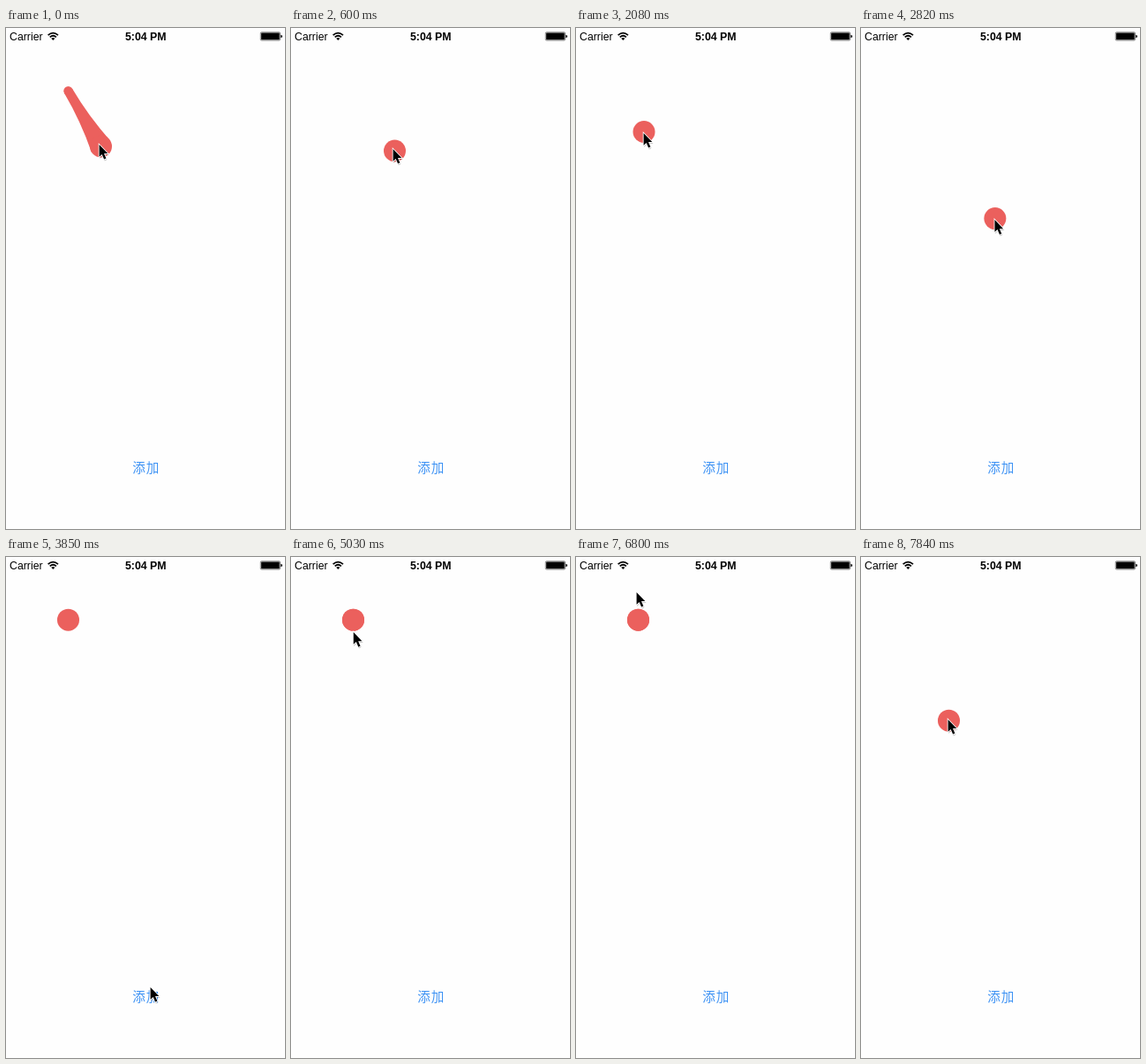
An HTML page for the animation above (7990 ms loop, 316 by 567 pixels).

```html
<!DOCTYPE html>
<html lang="zh">
<head>
<meta charset="utf-8">
<title>Sticky ball</title>
<style>
  html, body { margin: 0; width: 100%; height: 100%; overflow: hidden; background: #fefefe; }
  svg { display: block; width: 100%; height: 100%; }
  text { font: 12.3px "Liberation Sans", Arial, sans-serif; }
  .time { font-weight: bold; text-anchor: middle; }
  .add { font: 300 14.6px "Noto Sans CJK SC", "Noto Sans CJK", sans-serif; letter-spacing: 1px; fill: #3f93f4; text-anchor: middle; }
  .wifi { fill: none; stroke: #000; stroke-width: 1.7; }
  .arrow { stroke: #fff; stroke-width: 1.7; paint-order: stroke; }
</style>
</head>
<body>
<svg viewBox="0 0 316 567">
  <text x="4" y="13.6">Carrier</text>
  <g class="wifi">
    <path d="M47.6 8.1Q53.3 3 59 8.1"/>
    <path d="M49.7 10.3Q53.3 7.2 56.9 10.3"/>
  </g>
  <path d="M51.2 11.8Q53.3 10.3 55.4 11.8L53.3 14z"/>
  <text class="time" x="158.2" y="13.6">5:04 PM</text>
  <rect x="288.3" y="4.8" width="22.2" height="9.2" rx="1.2" fill="none" stroke="#000" stroke-width=".5"/>
  <rect x="289.1" y="5.6" width="20.6" height="7.6" rx=".4"/>
  <path d="M311.3 7.7Q313 7.9 313 9.4T311.3 11.1z"/>
  <text class="add" x="158.8" y="502.5">添加</text>

  <g fill="#eb605d">
    <path id="link"/>
    <circle id="anchor"/>
    <circle id="ball" r="12.5"/>
  </g>
  <g id="cursor">
    <path d="M.6 0V13.8L3.7 11L6.1 16.6L8.4 15.6L6 10.1H10.3z" transform="translate(.6 1.4)" stroke="#000" opacity=".2"/>
    <path class="arrow" d="M.6 0V13.8L3.7 11L6.1 16.6L8.4 15.6L6 10.1H10.3z"/>
  </g>
</svg>
<script>
const LOOP = 7990, STEPS = 54;
const HOME = { x: 70.5, y: 71.2 }, RADIUS = 12.5, SNAP = 77;

// Each gesture eases the pointer to a point; a dragged ball moves along with it.
const gesture = (from, to, x, y, action = "stay") => ({ from, to, end: { x, y }, action });
const gestures = [
  gesture(0, 3, 115, 137, "drag"),
  gesture(5, 7, 116.5, 140.5),
  gesture(10, 14, 76, 119, "drag"),
  gesture(14, 17, 120, 173, "drag"),
  gesture(18, 21, 239, 343, "drag"),
  gesture(21, 23, 160, 340, "remove"),
  gesture(24, 26, 163, 487, "remove"),
  gesture(27, 35, 66, 67, "home"),
  gesture(37, 41, 60, 109, "drag"),
  gesture(43, 44, 69, 158, "drag"),
  gesture(44, 46, 68, 40, "home"),
  gesture(46, 48, 69, 70),
  gesture(50, 53, 98, 184, "drag")
];

const mix = (a, b, k) => ({ x: a.x + (b.x - a.x) * k, y: a.y + (b.y - a.y) * k });
const ease = k => k * k * (3 - 2 * k);
const stretch = ball => Math.hypot(ball.x - HOME.x, ball.y - HOME.y);

// Chain the gestures: each starts where the one before it ended.
let pointer = { x: 105, y: 132 }, ball = { x: 107.5, y: 134 }, loose = false;
for (const g of gestures) {
  Object.assign(g, { start: pointer, ballStart: ball, loose });
  if (g.action === "drag") {
    ball = { x: ball.x + g.end.x - pointer.x, y: ball.y + g.end.y - pointer.y };
  } else if (g.action !== "stay") {
    ball = HOME;
  }
  g.ballEnd = ball;
  pointer = g.end;
  loose = ball !== HOME && (loose || stretch(ball) > SNAP);
}

// Two arcs pinched towards the middle join the shrinking anchor to the ball.
function linkPath(ball, small) {
  const dx = ball.x - HOME.x, dy = ball.y - HOME.y, d = Math.hypot(dx, dy) || 1;
  const at = (p, r) => `${p.x - dy / d * r} ${p.y + dx / d * r}`;
  const middle = mix(HOME, ball, .5);
  return `M${at(HOME, small)}Q${at(middle, small)} ${at(ball, RADIUS)}` +
    `L${at(ball, -RADIUS)}Q${at(middle, -small)} ${at(HOME, -small)}z`;
}

function set(id, attrs) {
  for (const name in attrs) document.getElementById(id).setAttribute(name, attrs[name]);
}

function draw(time) {
  const step = Math.floor((time % LOOP + 8) / LOOP * STEPS) % STEPS;
  const g = gestures.filter(g => g.from <= step).pop();
  const k = ease(Math.min(1, (step - g.from) / (g.to - g.from)));
  const pointer = mix(g.start, g.end, k), ball = mix(g.ballStart, g.ballEnd, k);
  const linked = !g.loose && stretch(ball) < SNAP;
  const small = RADIUS - stretch(ball) / 10;

  set("cursor", { transform: `translate(${pointer.x} ${pointer.y})` });
  set("ball", { cx: ball.x, cy: ball.y, visibility: g.action === "remove" ? "hidden" : "visible" });
  set("anchor", { cx: HOME.x, cy: HOME.y, r: linked ? small : 0 });
  set("link", { d: linked ? linkPath(ball, small) : "" });
}

const begin = performance.now();
function tick() {
  draw(performance.now() - begin);
  requestAnimationFrame(tick);
}
tick();
</script>
</body>
</html>
```
